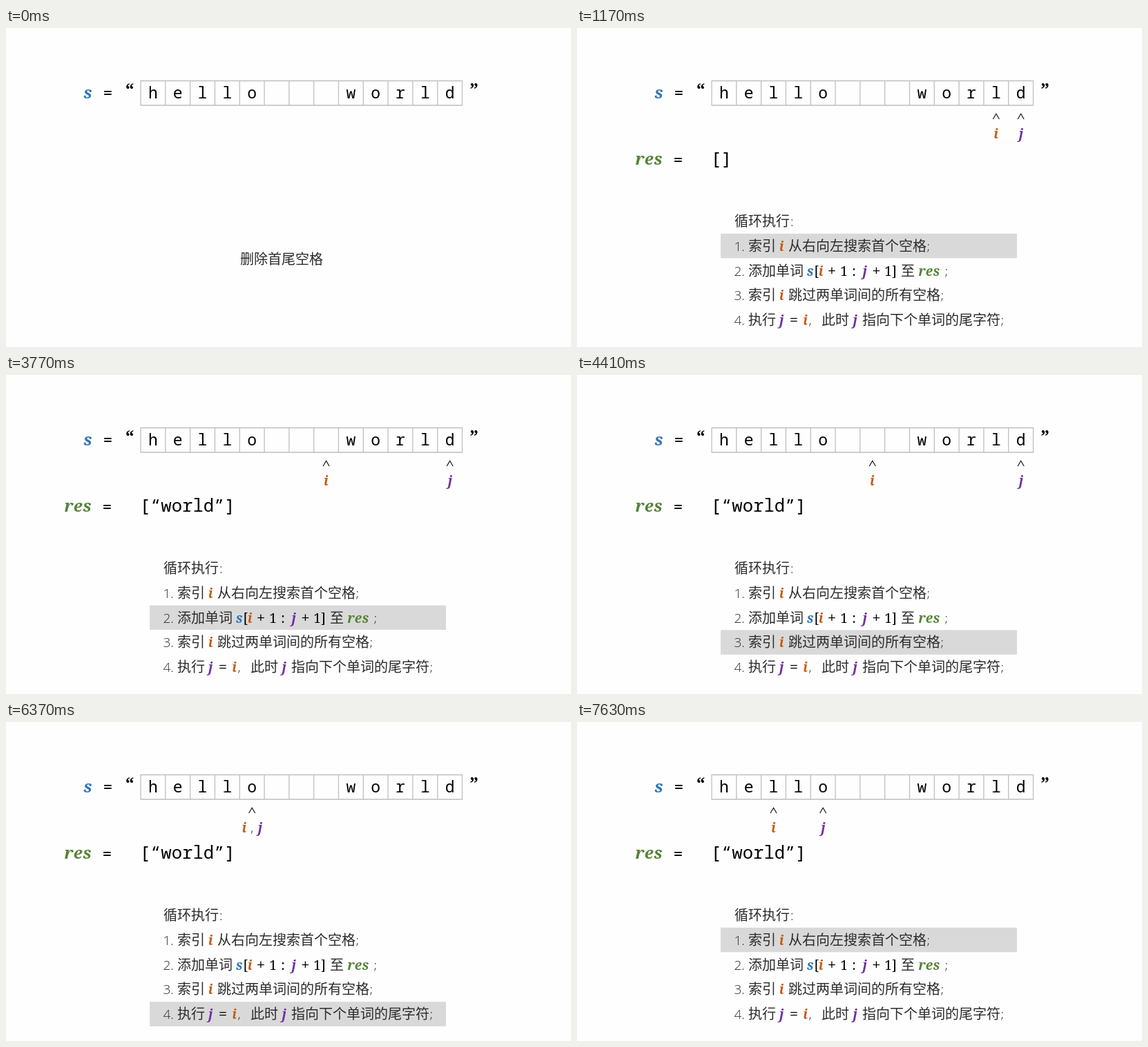
These frames come from a looping animation (818 px wide and 462 px high, 8 s). An HTML page:

```html
<!DOCTYPE html>
<html lang="zh-CN">
<head>
<meta charset="utf-8">
<style>
html, body { margin: 0; width: 100%; height: 100%; overflow: hidden; background: #fefefe; }
svg { display: block; width: 818px; height: 462px; }
text { white-space: pre; }
.mono { font-family: "Noto Sans Mono", monospace; }
.cjk { font-family: "Noto Sans CJK SC", "Noto Sans CJK", sans-serif; font-weight: 300; }
.thin { font-family: "Open Sans", sans-serif; font-weight: 300; }
.math { font-family: "Noto Serif", serif; }
.quote { font-family: "Noto Serif", serif; font-weight: bold; }
.var { font-family: "Noto Serif", serif; font-weight: bold; font-style: italic; letter-spacing: .03em; }
</style>
</head>
<body>
<svg id="stage" viewBox="0 0 818 462"></svg>
<script>
const BLUE = '#2e75b6', ORANGE = '#c55a11', PURPLE = '#7030a0', GREEN = '#548235';
const INK = '#2b2b2b';
const CELL = 35.81, LEFT = 195, ROW = 35.8;
const STARTS = [0, 530, 1170, 1830, 2490, 3130, 3770, 4410, 5070, 5730, 6370, 6990, 7630];
const LOOP = 8000;

const label = (cls, x, y, str, size, color = '#000', anchor = 'middle') =>
  `<text class="${cls}" x="${x}" y="${y}" text-anchor="${anchor}" font-size="${size}" fill="${color}">${str}</text>`;
const cjk = (x, y, str) => label('cjk', x, y, str, 20, INK, 'start');
const thin = (x, y, str) => label('thin', x, y, str, 19, INK, 'start');
const math = (x, y, str) => label('math', x, y, str, 19);
const sign = (x, y, str) => label('math', x, y, str, 22);
const mono = (x, y, str) => label('mono', x, y, str, 23);
const quote = (x, str) => label('quote', x, 97.5, str, 26);
const vars = (x, y, str, color, size = 19) => label('var', x, y, str, size, color);
const varI = (x, y) => vars(x, y, 'i', ORANGE);
const varJ = (x, y) => vars(x, y, 'j', PURPLE);
const cellX = k => LEFT + CELL * (k + 0.5);
const caret = x => `<path d="M${x - 4.5} 132L${x} 124.3L${x + 4.5} 132" fill="none" stroke="#000" stroke-width="1.1"/>`;

function header() {
  let grid = `M${LEFT} 76.5H${LEFT + 13 * CELL}M${LEFT} 112H${LEFT + 13 * CELL}`;
  for (let k = 0; k <= 13; k++) grid += `M${LEFT + k * CELL} 76V112.5`;
  let out = vars(118.8, 102.3, 's', BLUE, 24) + mono(147.5, 102.3, '=') + quote(179, '“') + quote(677.5, '”') +
    `<path d="${grid}" fill="none" stroke="#bfbfbf" stroke-width="1.3"/>`;
  [...'hello   world'].forEach((c, k) => { if (c !== ' ') out += mono(cellX(k), 101.5, c); });
  return out;
}

function result(str) {
  return vars(104.3, 198.3, 'res', GREEN, 24) + mono(146.5, 198.5, '=') +
    label('mono', 193.6, 198, str, 25.6, '#000', 'start');
}

function pointers(i, j) {
  const a = cellX(i), b = cellX(j);
  if (i === j) return caret(a) + varI(a - 11, 160) + thin(a - 2, 160, ',') + varJ(a + 12, 160);
  return caret(a) + varI(a, 160) + caret(b) + varJ(b + 0.5, 160);
}

function steps() {
  const y = k => 287 + ROW * k;
  return cjk(228, y(0), '循环执行') + thin(309, y(0), ':') +
    [1, 2, 3, 4].map(k => thin(227.5, y(k), k + '.')).join('') +
    cjk(248, y(1), '索引') + varI(296.5, y(1)) + cjk(306, y(1), '从右向左搜索首个空格') + thin(506.5, y(1), ';') +
    cjk(248, y(2), '添加单词') + vars(338, y(2), 's', BLUE) + math(347, y(2), '[') +
    varI(353.5, y(2)) + sign(369, y(2), '+') + math(386.5, y(2), '1') + math(401, y(2), ':') +
    varJ(417, y(2)) + sign(433.5, y(2), '+') + math(450.5, y(2), '1') + math(459.5, y(2), ']') +
    cjk(469, y(2), '至') + vars(510, y(2), 'res', GREEN) + thin(532.5, y(2), ';') +
    cjk(248, y(3), '索引') + varI(296.5, y(3)) + cjk(306, y(3), '跳过两单词间的所有空格') + thin(526.5, y(3), ';') +
    cjk(248, y(4), '执行') + varJ(296.5, y(4)) + sign(314, y(4), '=') + varI(331, y(4)) +
    thin(335.5, y(4), ',') + cjk(354, y(4), '此时') + varJ(403, y(4)) +
    cjk(413, y(4), '指向下个单词的尾字符') + thin(613.5, y(4), ';');
}

const HEADER = header(), STEPS = steps();

function scene(n) {
  if (n === 0) return HEADER + cjk(339, 341.5, '删除首尾空格');
  const i = n < 10 ? 13 - n : 14 - n;
  const j = n < 10 ? 12 : 4;
  let out = HEADER + pointers(i, j) + result(n < 6 ? '[]' : '[“world”]');
  if (n > 1) {
    const row = n < 6 || n > 10 ? 1 : n === 6 ? 2 : n < 10 ? 3 : 4;
    out += `<rect x="208" y="${262 + ROW * row}" width="429" height="35.5" fill="#d9d9d9"/>` + STEPS;
  }
  return out;
}

const stage = document.getElementById('stage');
let shown = -1;
function draw(now) {
  const t = now % LOOP;
  const n = STARTS.filter(s => s <= t).length - 1;
  if (n !== shown) stage.innerHTML = scene(shown = n);
  requestAnimationFrame(draw);
}
draw(0);
</script>
</body>
</html>
```
